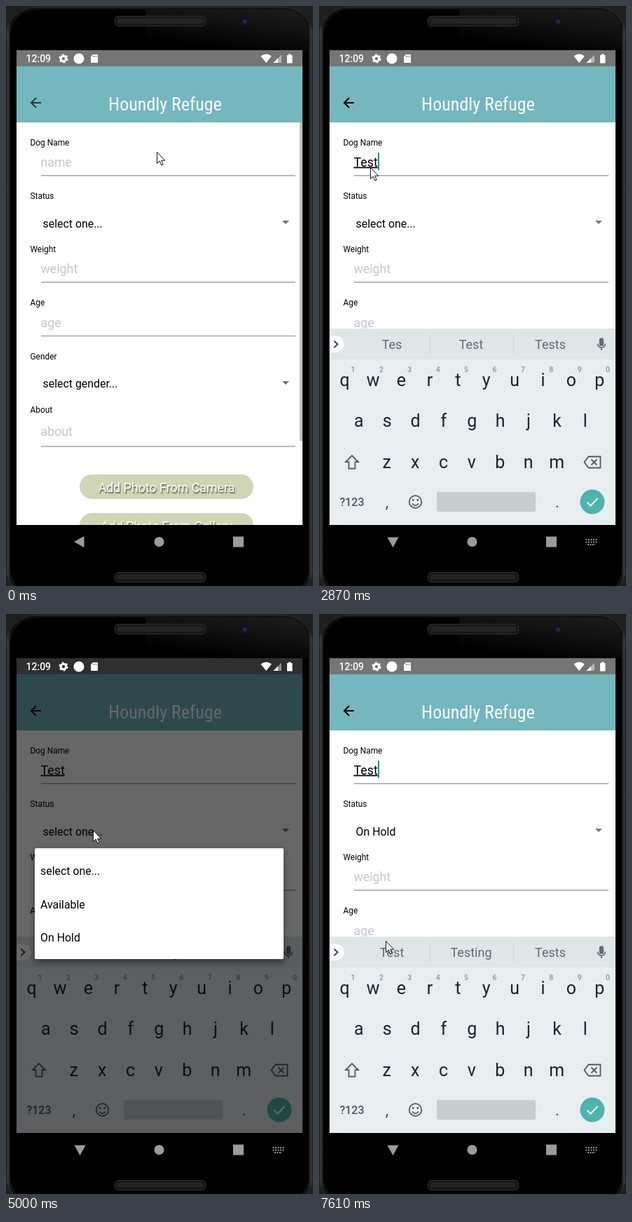
These frames come from a looping animation (438 px wide and 827 px high, 8000 ms). An HTML page:

```html
<!DOCTYPE html>
<html lang="en">
<head>
<meta charset="utf-8">
<title>Dog form</title>
<style>
html, body { margin: 0; width: 100%; height: 100%; overflow: hidden; background: #1c1c1c; }
svg { display: block; width: 438px; height: 827px; }
text { font-family: Roboto, "Noto Sans", sans-serif; }
.label { font-size: 11.9px; }
.field { font-size: 17.8px; }
.hint { fill: #c7c7c7; }
.item { font-size: 15.9px; }
.mid { text-anchor: middle; }
.title { font: 26px "Roboto Condensed", Roboto, sans-serif; font-stretch: 75%; fill: #fff; }
.btn { font-size: 17.8px; fill: #fff; text-shadow: 1px 1.5px 1.5px #0009; }
.key { font-size: 25px; fill: #132730; }
.num { font-size: 10.5px; font-weight: 500; fill: #89959b; }
.sug { font-size: 18px; fill: #5d6c74; }
.typed tspan { text-decoration: underline; }

/* One loop is 8 s, so 1% is 80 ms; every change is a hard cut. */
.a { animation: 8s step-end infinite; }
#cursor { animation-name: cursor; }
@keyframes cursor {
  0% { transform: translate(215px, 208px); }
  5% { transform: translate(142px, 210px); }
  6.5% { transform: translate(99px, 213px); }
  8.375% { transform: translate(73px, 230px); }
  42.375% { transform: translate(105px, 274px); }
  44% { transform: translate(122px, 298px); }
  45.75% { transform: translate(124px, 308px); }
  67.5% { transform: translate(119px, 340px); }
  69% { transform: translate(106px, 385px); }
  70.5% { transform: translate(100px, 409px); }
  72.375% { transform: translate(100px, 413px); }
  81.375% { transform: translate(99px, 428px); }
  82.875% { transform: translate(96px, 453px); }
  84.375% { transform: translate(95px, 464px); }
  86.25% { transform: translate(95px, 466px); }
}
#caret { animation-name: caret; }
@keyframes caret {
  0% { transform: translateX(49.5px); opacity: 0; }
  14.625% { transform: translateX(49.5px); opacity: 1; }
  21.5% { transform: translateX(49.5px); opacity: 0; }
  28% { transform: translateX(49.5px); opacity: 1; }
  29.75% { transform: translateX(60px); opacity: 1; }
  31.25% { transform: translateX(69px); opacity: 1; }
  32.75% { transform: translateX(78px); opacity: 1; }
  35.875% { transform: translateX(84px); opacity: 1; }
  44% { transform: translateX(84px); opacity: 0; }
  49.625% { transform: translateX(84px); opacity: 1; }
  59.125% { transform: translateX(84px); opacity: 0; }
  64.375% { transform: translateX(84px); opacity: 1; }
}
#back { animation-name: back; }
@keyframes back { 0% { opacity: .68; } 1.875% { opacity: 1; } }
#bar { animation-name: bar; }
@keyframes bar { 0% { opacity: 1; } 16.5% { opacity: .25; } 21.5% { opacity: 0; } }
#keyboard { animation-name: keyboard; }
@keyframes keyboard {
  0% { opacity: 0; transform: none; }
  26.375% { opacity: .83; transform: translateY(13px); }
  28% { opacity: 1; transform: none; }
}
#ripple { animation-name: ripple; }
@keyframes ripple {
  0% { opacity: 0; transform: scale(1); }
  54.25% { opacity: .09; transform: scale(.75); }
  55.75% { opacity: .14; transform: scale(1); }
  59.125% { opacity: .07; transform: scale(1); }
  60.625% { opacity: 0; transform: scale(1); }
}
#dim { animation-name: dim; }
@keyframes dim { 0% { opacity: 0; } 62.5% { opacity: .6; } 93.25% { opacity: .25; } 95.125% { opacity: 0; } }
#popup { animation-name: popup; }
@keyframes popup { 0% { opacity: 0; } 62.5% { opacity: 1; } 93.25% { opacity: .4; } 95.125% { opacity: 0; } }

.shrunk { animation-name: shrunk; }
@keyframes shrunk { 0% { visibility: hidden; } 23% { visibility: visible; } }
.nav-off { animation-name: navOff; }
@keyframes navOff { 0% { visibility: visible; } 24.5% { visibility: hidden; } }
.nav-on { animation-name: navOn; }
@keyframes navOn { 0% { visibility: hidden; } 24.5% { visibility: visible; } }
.empty { animation-name: empty; }
@keyframes empty { 0% { visibility: visible; } 29.75% { visibility: hidden; } }
.t1 { animation-name: t1; }
@keyframes t1 { 0% { visibility: hidden; } 29.75% { visibility: visible; } }
.t2 { animation-name: t2; }
@keyframes t2 { 0% { visibility: hidden; } 31.25% { visibility: visible; } }
.t3 { animation-name: t3; }
@keyframes t3 { 0% { visibility: hidden; } 32.75% { visibility: visible; } }
.t4 { animation-name: t4; }
@keyframes t4 { 0% { visibility: hidden; } 35.875% { visibility: visible; } }
.sugT { animation-name: sugT; }
@keyframes sugT { 0% { visibility: hidden; } 29.75% { visibility: visible; } 32.75% { visibility: hidden; } }
.sugTes { animation-name: sugTes; }
@keyframes sugTes { 0% { visibility: hidden; } 32.75% { visibility: visible; } 37.375% { visibility: hidden; } }
.sugTest { animation-name: sugTest; }
@keyframes sugTest { 0% { visibility: hidden; } 37.375% { visibility: visible; } }
.unset { animation-name: unset-status; }
@keyframes unset-status { 0% { visibility: visible; } 93.25% { visibility: hidden; } }
.held { animation-name: held; }
@keyframes held { 0% { visibility: hidden; } 93.25% { visibility: visible; } }
</style>
</head>
<body>
<svg viewBox="0 0 438 827">
  <defs>
    <linearGradient id="rim">
      <stop offset="0" stop-color="#161616"/><stop offset=".006" stop-color="#3b3b3b"/>
      <stop offset=".014" stop-color="#111"/><stop offset=".986" stop-color="#111"/>
      <stop offset=".994" stop-color="#3b3b3b"/><stop offset="1" stop-color="#161616"/>
    </linearGradient>
    <linearGradient id="glare" x1=".45" y1="1" x2="1" y2="0">
      <stop offset="0" stop-color="#000"/><stop offset="1" stop-color="#1e1e1e"/>
    </linearGradient>
    <filter id="shadow" x="-10%" y="-10%" width="120%" height="130%">
      <feDropShadow dx="0" dy="5" stdDeviation="5" flood-opacity=".4"/>
    </filter>
    <clipPath id="screen"><rect x="15" y="63" width="408" height="677"/></clipPath>
    <clipPath id="genderBox"><rect x="45" y="525" width="340" height="22"/></clipPath>
    <path id="drop" d="M394 0h10l-5 5z" fill="#757575"/>
    <g id="speaker">
      <rect x="155.5" y=".5" width="129" height="14" rx="5" fill="#151515" stroke="#333"/>
      <rect x="159" y="3.5" width="122" height="8" rx="3" fill="#242424"/>
    </g>
  </defs>

  <!-- Phone body -->
  <rect width="438" height="827" fill="#1f1f1f"/>
  <rect x="0" y="2" width="438" height="840" rx="42" fill="url(#rim)" stroke="#2c2c2c"/>
  <rect x="6" y="5" width="426" height="835" rx="38" fill="#000"/>
  <path d="M200 63V5H394Q432 5 432 43V63z" fill="url(#glare)"/>
  <use href="#speaker" y="14"/>
  <use href="#speaker" y="807"/>
  <circle cx="341" cy="22" r="6" fill="#101522"/>
  <circle cx="341" cy="22" r="3" fill="#1d2a4d"/>

  <!-- App -->
  <g clip-path="url(#screen)">
    <rect x="15" y="63" width="408" height="677" fill="#fff"/>
    <rect x="15" y="63" width="408" height="23" fill="#757575"/>
    <rect x="15" y="86" width="408" height="80" fill="#74b7be"/>
    <path id="back" class="a" d="M50 138H36.5M43 131l-7 7 7 7" fill="none" stroke="#000" stroke-width="2"/>
    <text class="title mid" x="227" y="149">Houndly Refuge</text>

    <g id="labels" class="label"></g>
    <path d="M50 241.7H413M50 393.7H413M50 470.5H413M50 628H413" stroke="#a1a5b0" stroke-width="1.4"/>
    <g class="field hint">
      <text class="a empty" x="49.5" y="228.5">name</text>
      <text x="49.5" y="381">weight</text>
      <text x="49.5" y="457.5">age</text>
      <text x="49.5" y="612.5">about</text>
    </g>
    <text class="field typed" x="49.5" y="228.5"><tspan class="a t1">T</tspan><tspan class="a t2">e</tspan><tspan class="a t3">s</tspan><tspan class="a t4">t</tspan></text>
    <rect id="caret" class="a" y="209" width="2" height="25" fill="#009688"/>
    <g class="item">
      <text class="a unset" x="52.5" y="315.5">select one...</text>
      <text class="a held" x="52.5" y="315.5">On Hold</text>
      <text x="52.5" y="544" clip-path="url(#genderBox)">select gender...</text>
    </g>
    <g transform="translate(399 308)"><circle id="ripple" class="a" r="20"/></g>
    <use href="#drop" y="306"/>
    <use href="#drop" y="535"/>
    <rect x="105" y="668" width="248" height="35" rx="17.5" fill="#d0d6b5"/>
    <rect x="105" y="723" width="248" height="35" rx="17.5" fill="#d0d6b5"/>
    <text class="btn mid" x="229" y="693">Add Photo From Camera</text>
    <text class="btn mid" x="229" y="748">Add Photo From Gallery</text>
    <rect id="bar" class="a" x="419" y="166" width="4" height="454" fill="#bebebe"/>
    <rect class="a shrunk" x="15" y="461" width="408" height="279" fill="#fff"/>
  </g>

  <g id="keyboard" class="a">
    <rect x="15" y="460" width="408" height="280" fill="#e8edf0"/>
    <rect x="15" y="460" width="408" height="44" fill="#e0e5e8"/>
    <path d="M15 470.5h9a11.7 11.7 0 0 1 0 23.4h-9z" fill="#fff"/>
    <path d="M21.5 477.500l5 4.700-5 4.700" fill="none" stroke="#37474f" stroke-width="2"/>
    <path d="M158.500 470v25M277.500 470v25" stroke="#ccd2d5"/>
    <g id="suggestions" class="sug mid"></g>
    <g fill="none" stroke="#5d6c74" stroke-width="1.7">
      <rect x="400.700" y="474" width="4.600" height="10" rx="2.300" fill="#5d6c74"/>
      <path d="M397.500 481.500a5.500 5.500 0 0 0 11 0M403 487v4"/>
    </g>
    <g id="keys" class="mid"></g>
    <path class="a empty" d="M47 640l10.500 10.500h-5v9h-11v-9h-5z" fill="#5d6c74"/>
    <path class="a t1" d="M47 641l9 9h-4.500v9.500h-9v-9.500h-4.500z" fill="none" stroke="#4f5f67" stroke-width="1.800"/>
    <g fill="none" stroke="#4f5f67" stroke-width="1.800">
      <path d="M384.500 642.500h17v16h-17l-6-8zM388.500 646.500l8 8m0-8l-8 8"/>
      <circle cx="137.500" cy="707" r="8.800"/>
      <path d="M133 709.500q4.500 5.500 9 0"/>
    </g>
    <circle cx="134.300" cy="704.500" r="1.400" fill="#4f5f67"/>
    <circle cx="140.700" cy="704.500" r="1.400" fill="#4f5f67"/>
    <text class="mid" x="47" y="713" font-size="16" font-weight="500" fill="#4a5a62">?123</text>
    <text class="mid" x="97" y="715" font-size="22" fill="#37474f">,</text>
    <text class="mid" x="340" y="715" font-size="22" fill="#37474f">.</text>
    <rect x="168" y="693" width="141" height="28" rx="3" fill="#c8cdd0"/>
    <circle cx="390" cy="707" r="17.500" fill="#4db6ac"/>
    <path d="M382.500 707.500l5 5 10-10.500" fill="none" stroke="#fff" stroke-width="2"/>
  </g>

  <!-- Navigation icons -->
  <g fill="#9b9b9b">
    <path class="a nav-off" d="M111.500 756v16L97 764z"/>
    <path class="a nav-on" d="M97.500 757.500h16l-8 14.500z"/>
    <circle cx="218.500" cy="764" r="7"/>
    <rect x="324" y="756.500" width="15" height="15"/>
    <path class="a nav-on" d="M380.500 761h16M380.500 764.500h16M383 768h11" fill="none" stroke="#9b9b9b" stroke-width="2" stroke-dasharray="2 1.500"/>
  </g>

  <rect id="dim" class="a" x="15" y="63" width="408" height="677"/>

  <!-- Status icons -->
  <g fill="#fff">
    <text x="28.500" y="80" font-size="14" font-weight="500">12:09</text>
    <circle cx="82" cy="75" r="3.700" fill="none" stroke="#fff" stroke-width="3"/>
    <circle cx="82" cy="75" r="5.600" fill="none" stroke="#fff" stroke-width="2" stroke-dasharray="2.900 2.964"/>
    <circle cx="104" cy="75" r="7.500"/>
    <path d="M124 69h7v12h-10V72z"/>
    <path d="M363.500 71.500q7.700-6 15.400 0L371.200 81z"/>
    <path d="M381.500 81L393 69.500V81z" opacity=".45"/>
    <path d="M381.500 81l6.500-6.500V81z"/>
    <path d="M401 70h2v-1.500h3.500V70h2v11.500H401z"/>
  </g>
  <path d="M124.500 70.500v2.500M126.700 70.500v2.500M128.900 70.500v2.500" stroke="#757575"/>

  <g id="popup" class="a">
    <rect x="41" y="334" width="355" height="158" rx="2" fill="#fff" filter="url(#shadow)"/>
    <g class="item">
      <text x="49" y="372">select one...</text>
      <text x="49" y="419.500">Available</text>
      <text x="49" y="467">On Hold</text>
    </g>
  </g>

  <path id="cursor" class="a" d="M.5.5V16.500l3.700-3.500 2.500 6 2.500-1-2.500-5.800h5z" fill="#fff" stroke="#111"/>
</svg>
<script>
const NS = "http://www.w3.org/2000/svg";
const byId = id => document.getElementById(id);

function add(parent, tag, attrs, text = "") {
  const el = document.createElementNS(NS, tag);
  for (const name in attrs) el.setAttribute(name, attrs[name]);
  el.textContent = text;
  return parent.appendChild(el);
}

["Dog Name", "Status", "Weight", "Age", "Gender", "About"].forEach((label, i) =>
  add(byId("labels"), "text", { x: 34.5, y: 198.5 + 76.3 * i }, label));

const suggestions = {
  empty: ["Thanks", "I", "We"],
  sugT: ["The", "This", "That"],
  sugTes: ["Tes", "Test", "Tests"],
  sugTest: ["Test", "Testing", "Tests"]
};
for (const state in suggestions) {
  const group = add(byId("suggestions"), "g", { class: "a " + state });
  suggestions[state].forEach((word, i) =>
    add(group, "text", { x: 104 + 113 * i, y: 489 }, word));
}

const rows = [["qwertyuiop", 36.700, 542], ["asdfghjkl", 56.700, 600], ["zxcvbnm", 96.700, 658.500]];
const upper = add(byId("keys"), "g", { class: "a empty key" });
const lower = add(byId("keys"), "g", { class: "a t1 key" });
for (const [letters, left, y] of rows) {
  [...letters].forEach((letter, i) => {
    const x = left + 40.400 * i;
    add(upper, "text", { x, y }, letter.toUpperCase());
    add(lower, "text", { x, y }, letter);
  });
}
[..."1234567890"].forEach((digit, i) =>
  add(byId("keys"), "text", { class: "num", x: 48.500 + 40.400 * i, y: 522 }, digit));
</script>
</body>
</html>
```
